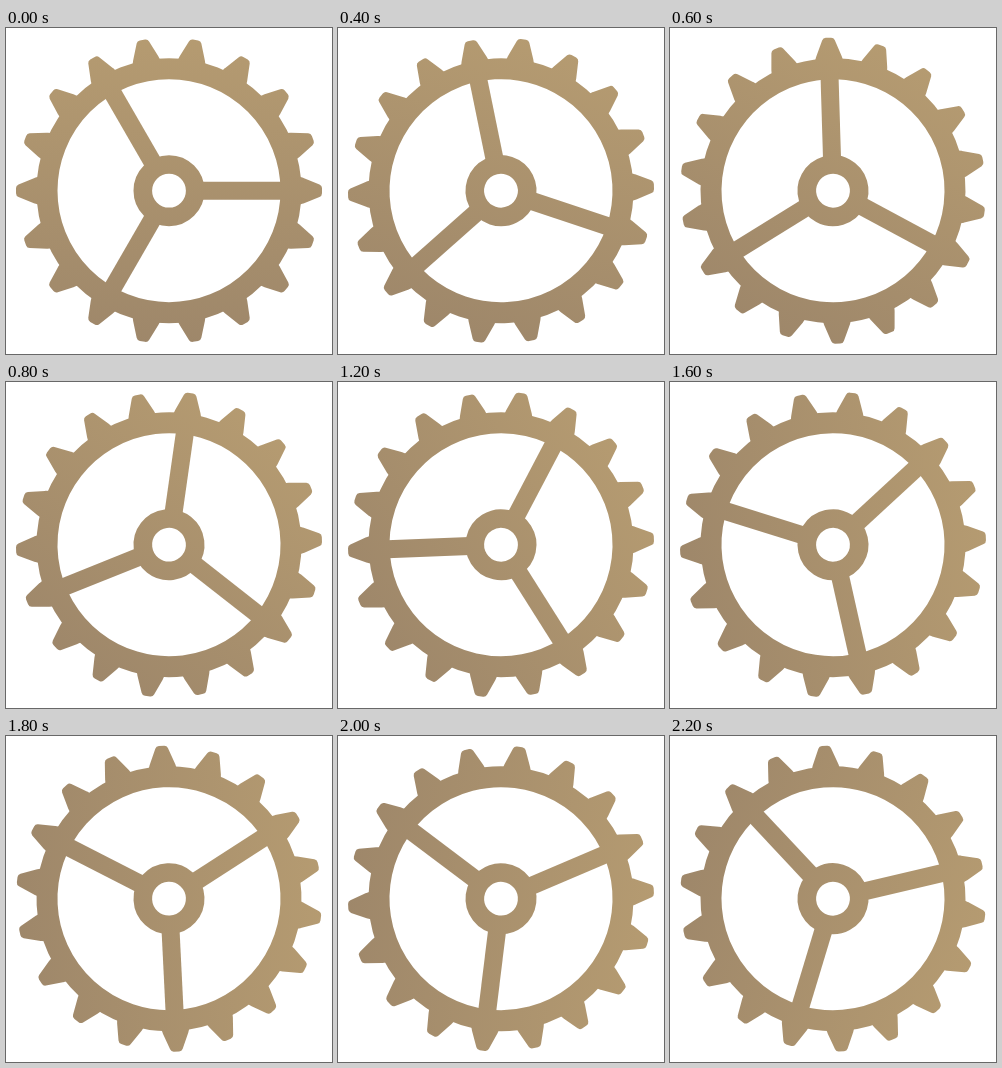
An HTML page for the animation above (2.4 s loop, 326x326 px).

```html
<!DOCTYPE html>
<html lang="en">
<head>
<meta charset="utf-8">
<title>Turning gear</title>
<style>
  html, body { margin: 0; width: 100%; height: 100%; overflow: hidden; background: #fff; }
  svg { display: block; width: 100%; height: 100%; }
</style>
</head>
<body>
<svg viewBox="0 0 326 326">
  <defs>
    <linearGradient id="bronze" x1="0" y1="0" x2="0" y2="1">
      <stop offset="0" stop-color="#b59b71"/>
      <stop offset="1" stop-color="#9e876a"/>
    </linearGradient>
    <path id="tooth" d="M128 -10.5L133 -9L149 -2.6V2.6L133 9L128 10.5Z"
      fill="#fff" stroke="#fff" stroke-width="8" stroke-linejoin="round"/>
    <path id="spoke" d="M25 0H120" stroke="#fff" stroke-width="18"/>
    <mask id="shape" maskUnits="userSpaceOnUse" x="-160" y="-160" width="320" height="320">
      <g id="parts"></g>
      <g fill="none" stroke="#fff">
        <circle r="122" stroke-width="21"/>
        <circle r="26.2" stroke-width="18.6"/>
      </g>
    </mask>
  </defs>
  <g transform="translate(163 162.7)">
    <g id="gear">
      <rect x="-155" y="-155" width="310" height="310" fill="url(#bronze)" mask="url(#shape)"/>
    </g>
  </g>
</svg>
<script>
  const gear = document.getElementById('gear');
  const ring = (id, count) => Array.from({ length: count }, (_, i) =>
    `<use href="#${id}" transform="rotate(${i * 360 / count})"/>`).join('');
  document.getElementById('parts').innerHTML = ring('tooth', 18) + ring('spoke', 3);

  const LOOP = 2400, STEP = 200;

  function draw(now) {
    const step = Math.floor(now % LOOP / STEP);
    // The wheel rests upright first, then ticks on evenly
    const angle = step ? 9.82 * step - 1.2 : 0;
    gear.setAttribute('transform', `rotate(${angle})`);
  }

  const start = performance.now();
  function tick() {
    draw(performance.now() - start);
    requestAnimationFrame(tick);
  }
  tick();
</script>
</body>
</html>
```
